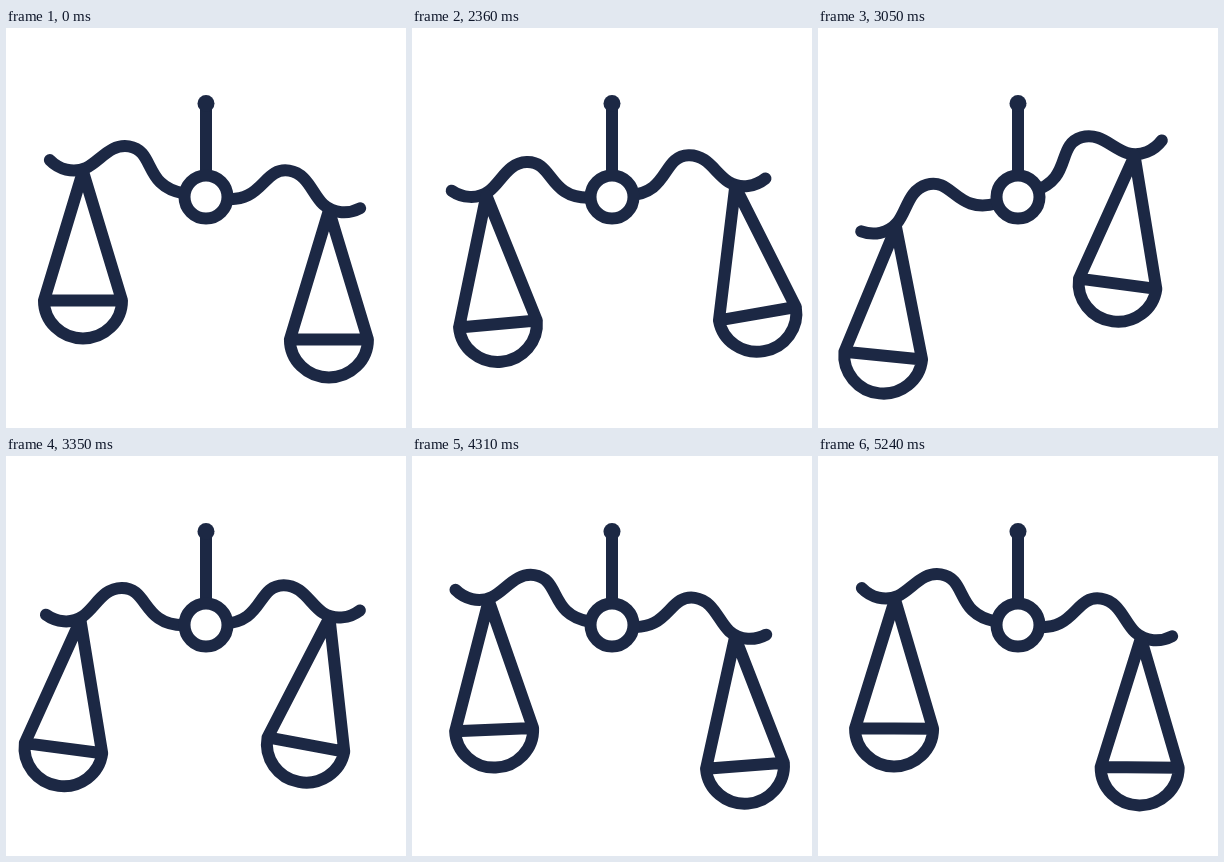
Animation of 400 by 400 pixels, one loop 5.27 s. Source, as an HTML page:

```html
<!DOCTYPE html>
<html>
<head>
<meta charset="utf-8">
<style>
html, body { margin: 0; height: 100%; overflow: hidden; background: #fff; }
svg { display: block; width: 100vw; height: 100vh; }
</style>
</head>
<body>
<svg viewBox="0 0 400 400" fill="none" stroke="#1c2844" stroke-width="12" stroke-linecap="round" stroke-linejoin="round">
  <defs>
    <path id="arm" d="M40 157C50 164.5 65 167 77 159C90 150 97 131 116 131C143 131 136 168.5 178 169"/>
    <path id="pan" d="M-39 129L0 0L39 129ZA39 38 0 0 0 39 129"/>
  </defs>
  <g id="beam">
    <use href="#arm"/>
    <use href="#arm" transform="matrix(-1 0 0 1 394 -1)"/>
  </g>
  <use id="left" href="#pan"/>
  <use id="right" href="#pan"/>
  <path d="M200 76V145"/>
  <circle cx="200" cy="75.5" r="8.5" fill="#1c2844" stroke="none"/>
  <circle cx="200" cy="169" r="21.5" fill="#fff"/>
</svg>
<script>
const LOOP = 5270, START = 2000, STEP = 30;
const PIVOT = { x: 200, y: 169 };

const byId = id => document.getElementById(id);

function ease(u) {
  u = Math.min(1, Math.max(0, u));
  const soft = u * u * (3 - 2 * u);
  const steep = u * u * u * (u * (6 * u - 15) + 10);
  return (soft + steep) / 2;
}

// Eases through the poses, reaching each at the matching step
const sway = (k, steps, poses) => steps.slice(1).reduce((sum, end, i) =>
  sum + (poses[i + 1] - poses[i]) * ease((k - steps[i]) / (end - steps[i])), poses[0]);

const tiltAt = k => sway(k, [0, 28, 62, 80, 104], [9, -20, 18.8, 7.8, 9]);

// The pans lag behind the beam and swing out to these peaks
const swingAt = (k, ...peaks) => sway(k, [0, 13, 43, 77, 95, 116], [0, ...peaks, 0]);

function hang(id, dx, dy, tilt, swing) {
  const a = tilt * Math.PI / 180, c = Math.cos(a), s = Math.sin(a);
  const x = PIVOT.x + dx * c - dy * s;
  const y = PIVOT.y + dx * s + dy * c;
  byId(id).setAttribute('transform', `translate(${x} ${y}) rotate(${swing})`);
}

function draw(now) {
  const k = Math.max(0, Math.floor((now % LOOP - START) / STEP));
  const tilt = tiltAt(k);
  byId('beam').setAttribute('transform', `rotate(${tilt} ${PIVOT.x} ${PIVOT.y})`);
  hang('left', -125.5, -6, tilt, swingAt(k, -5.2, 7.6, -2.4, 1.3));
  hang('right', 123.5, -6, tilt, swingAt(k, -10, 10.6, -4.4, 1.8));
}

const begin = performance.now();
function tick() {
  draw(performance.now() - begin);
  requestAnimationFrame(tick);
}
tick();
</script>
</body>
</html>
```
